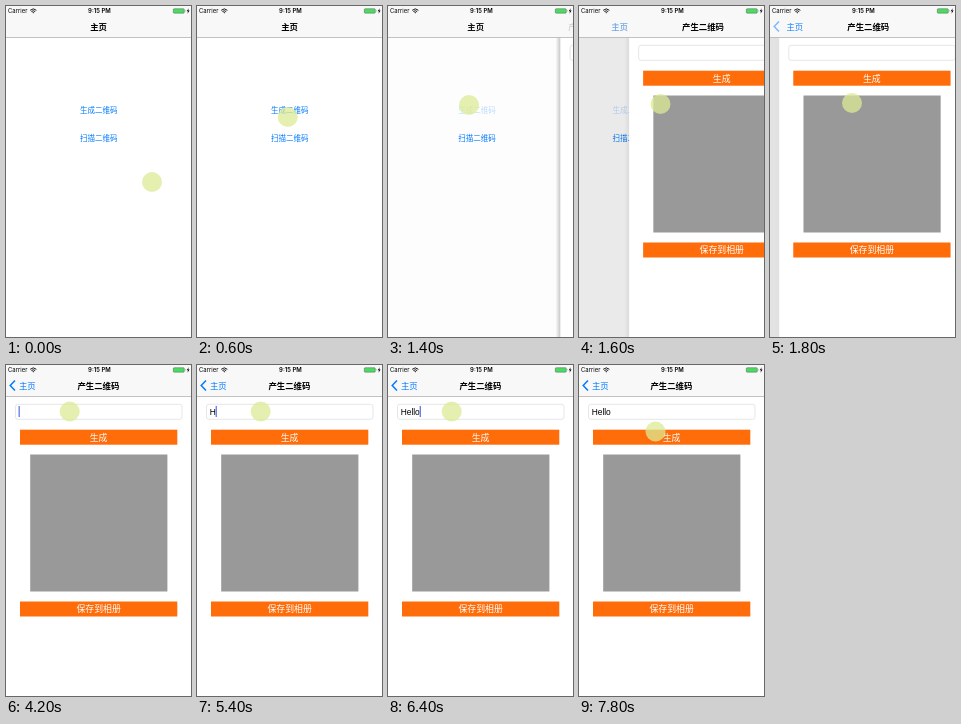
An HTML page for the animation above (8 s loop, 185 by 331 pixels).

```html
<!DOCTYPE html>
<html lang="zh-CN">
<head>
<meta charset="utf-8">
<style>
  html, body { margin: 0; width: 100%; height: 100%; overflow: hidden; background: #fff; }
  svg { display: block; width: 100vw; height: 100vh; }
  text { font-family: "Noto Sans CJK SC", "Noto Sans CJK", sans-serif; }
  .mid { text-anchor: middle; }
  .title { font-size: 8.4px; font-weight: 700; fill: #000; }
  .link { font-size: 7.5px; fill: #007aff; }
  .button { font-size: 8.9px; fill: #fff; }
  .status { font: 5.95px Inter, sans-serif; }
  .entry { font: 8.4px "Liberation Sans", Arial, sans-serif; }
</style>
</head>
<body>
<svg viewBox="0 0 185 331">
  <defs>
    <linearGradient id="edge">
      <stop offset="0" stop-opacity="0"/>
      <stop offset="1" stop-opacity=".24"/>
    </linearGradient>
  </defs>

  <g id="home">
    <rect width="185" height="331" fill="#fff"/>
    <text id="make" class="link mid" x="92.8" y="106.8">生成二维码</text>
    <text class="link mid" x="92.8" y="135.3">扫描二维码</text>
  </g>
  <rect id="dim" width="185" height="331"/>

  <g id="page">
    <rect id="shadow" x="-5" width="5" height="331" fill="url(#edge)"/>
    <rect width="185" height="331" fill="#fff"/>
    <rect x="9.5" y="39.3" width="166.5" height="15" rx="2.4" fill="#fff" stroke="#dcdcdc" stroke-width=".7"/>
    <text id="entry" class="entry" x="12.7" y="50"></text>
    <rect id="caret" y="41" width="1.1" height="11" fill="#3f63e0"/>
    <rect x="14" y="64.7" width="157.3" height="15" fill="#ff6c0a"/>
    <text class="button mid" x="92.6" y="75.6">生成</text>
    <rect x="24.2" y="89.5" width="137.2" height="137" fill="#999"/>
    <rect x="14" y="236.5" width="157.3" height="15" fill="#ff6c0a"/>
    <text class="button mid" x="92.6" y="247.4">保存到相册</text>
  </g>

  <rect width="185" height="31.3" fill="#f8f8f8"/>
  <rect y="31.1" width="185" height=".8" fill="#b4b4b4"/>
  <text class="status" x="2" y="7.1">Carrier</text>
  <g fill="none" stroke="#000" stroke-width=".9">
    <path d="M24.2 4.3Q27.3 1.4 30.4 4.3M25.4 5.6Q27.3 3.9 29.2 5.6"/>
    <path d="M26.3 6.2h2l-1 1.2z" fill="#000" stroke="none"/>
  </g>
  <text class="status mid" x="93.4" y="7.1" font-weight="600" style="font-weight:600">9:15 PM</text>
  <rect x="167.3" y="2.7" width="11" height="4.5" rx=".9" fill="#4cd964" stroke="#444" stroke-width=".4"/>
  <path d="M179 4.1q.9.8 0 1.7z" fill="#444"/>
  <path d="M182.7 2.2l-2 3h1.3l-.5 2.5 2.1-3.2h-1.4z"/>

  <text id="oldTitle" class="title mid" y="24.1">主页</text>
  <text id="newTitle" class="title mid" y="24.1">产生二维码</text>
  <path id="chevron" d="M9 15.6L4.2 20.5L9 25.4" fill="none" stroke="#007aff" stroke-width="1.5"/>
  <text id="back" y="23.9" font-size="8.4" fill="#007aff">主页</text>

  <circle id="touch" r="10" fill="rgb(220,235,149)" fill-opacity=".74"/>
</svg>
<script>
const LOOP = 8000, STEP = 200;
const el = {};
document.querySelectorAll('[id]').forEach(n => el[n.id] = n);

// touch path: time, x, y
const path = [
  [0, 146, 176], [800, 80.5, 99], [1400, 81, 99], [1800, 82, 97], [2200, 82, 96.3],
  [3200, 73, 44.3], [4199, 73, 44.3], [4200, 63.7, 46.5], [7200, 63.7, 46.5], [7800, 76.5, 66.5]
];
const typing = [5400, 5600, 6000, 6200, 6400];

const clamp = v => Math.min(1, Math.max(0, v));
const lerp = (a, b, p) => a + (b - a) * p;
const smooth = p => p * p * (3 - 2 * p);
const set = (node, attrs) => {
  for (const k in attrs) node.setAttribute(k, attrs[k]);
};

function touchAt(t) {
  const i = path.findIndex(k => k[0] > t);
  if (i < 0) return path[path.length - 1].slice(1);
  const [a, b] = [path[i - 1], path[i]];
  const p = smooth((t - a[0]) / (b[0] - a[0]));
  return [lerp(a[1], b[1], p), lerp(a[2], b[2], p)];
}

// critically damped spring for the page push
function pushAt(t) {
  const w = Math.max(0, t - 1361) * 0.0108;
  const p = 1 - (1 + w) * Math.exp(-w);
  return t >= 2200 ? 1 : p;
}

function caretAt(t) {
  if (t < 3600 || t >= 7600) return 0;
  if (t >= 4600 && t < 4800 || t >= 7400) return 0.5;
  return t >= 4800 && t < 5000 ? 0 : 1;
}

function draw(t) {
  const p = pushAt(t);
  set(el.home, { transform: `translate(${-55.5 * p} 0)` });
  set(el.make, { opacity: t >= 1200 ? 0.25 : 1 });
  set(el.dim, { opacity: 0.115 * p });
  set(el.page, { transform: `translate(${185 * (1 - p)} 0)`, visibility: p ? 'visible' : 'hidden' });
  set(el.shadow, { opacity: 1 - p });

  set(el.oldTitle, { x: lerp(92.5, 21.4, p), opacity: clamp(1 - 1.2 * p) });
  set(el.newTitle, { x: lerp(209, 92.4, p), opacity: clamp(2 * p) });
  set(el.back, { x: lerp(84, 12.9, p), opacity: clamp(1.6 * p - 0.6) });
  set(el.chevron, { opacity: clamp(10 * p - 9) });

  el.entry.textContent = 'Hello'.slice(0, typing.filter(k => t >= k).length);
  set(el.caret, { x: 12.6 + el.entry.getComputedTextLength(), opacity: caretAt(t) });

  const [cx, cy] = touchAt(t);
  set(el.touch, { cx, cy });
}

const start = performance.now();
function tick() {
  const t = (performance.now() - start) % LOOP;
  draw(Math.floor(t / STEP) * STEP);
  requestAnimationFrame(tick);
}
tick();
</script>
</body>
</html>
```
